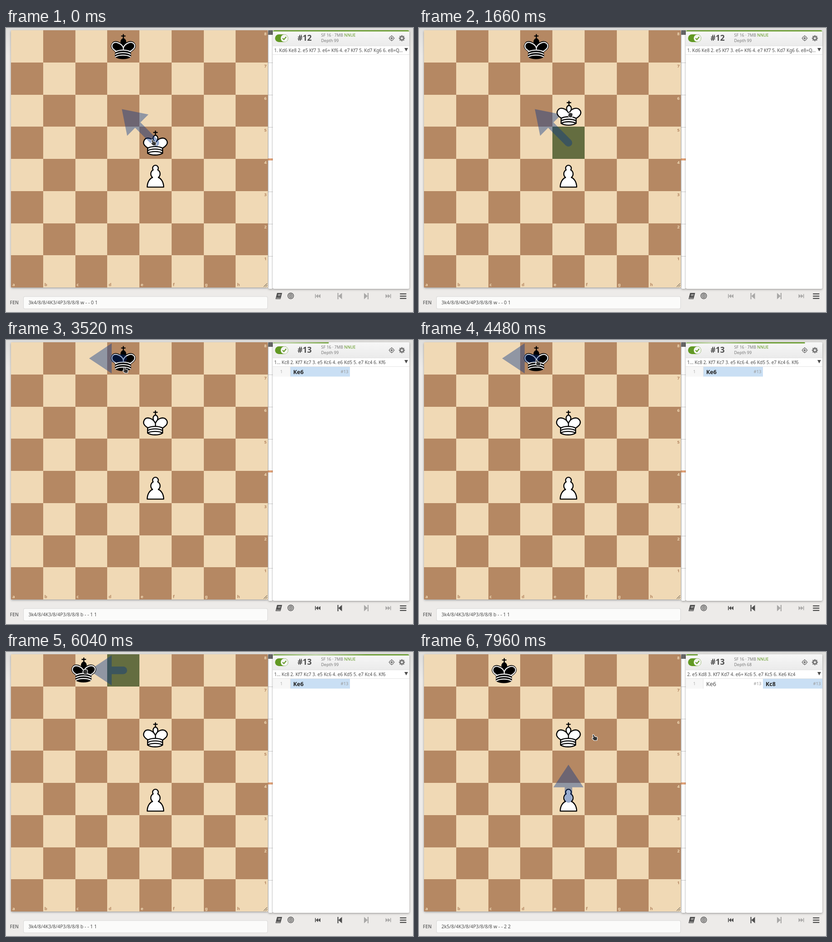
An HTML page with a canvas that plays this animation: 897x625 px, repeating every 8000 ms.

```html
<!DOCTYPE html>
<html lang="en">
<head>
<meta charset="utf-8">
<title>Chess endgame analysis</title>
<style>
html, body { margin: 0; width: 100%; height: 100%; overflow: hidden; background: #edebe9; }
canvas { display: block; }
</style>
</head>
<body>
<canvas id="stage" width="897" height="625"></canvas>
<script>
const ctx = document.getElementById('stage').getContext('2d');
const LOOP = 8000, BX = 11, BY = 5, SQ = 70.75;
const LIGHT = '#f0d9b5', DARK = '#b58863', GREEN = '#629924', INK = '#4d4d4d', DIM = '#787878', PALE = '#a9a8a7';
const FONT = '"Noto Sans", "Open Sans", sans-serif';

// piece outlines on a 45 unit square
const cross = new Path2D('M22.5 11.63V6M20 8h5');
const crown = new Path2D('M22.5 25s4.5-7.5 3-10.5c0 0-1-2.5-3-2.5s-3 2.5-3 2.5c-1.5 3 3 10.5 3 10.5');
const robe = new Path2D('M11.5 37c5.5 3.5 15.5 3.5 21 0v-7s9-4.5 6-10.5c-4-6.5-13.5-3.5-16 4V27v-3.5c-3.5-7.5-13-10.5-16-4-3 6 5 10 5 10V37');
const folds = new Path2D('M11.5 30c5.5-3 15.5-3 21 0m-21 3.5c5.5-3 15.5-3 21 0m-21 3.5c5.5-3 15.5-3 21 0');
const trim = new Path2D('M32 29.5s8.5-4 6.03-9.65C34.15 14 25 18 22.5 24.5l.01 2.1-.01-2.1C20 18 9.906 14 6.997 19.85c-2.497 5.65 4.853 9 4.853 9');
const pawnShape = new Path2D('M22.5 9c-2.21 0-4 1.79-4 4 0 .89.29 1.71.78 2.38C17.33 16.5 16 18.59 16 21c0 2.03.94 3.84 2.41 5.03-3 1.06-7.41 5.55-7.41 13.47h23c0-7.92-4.41-12.41-7.41-13.47 1.47-1.19 2.41-3 2.41-5.03 0-2.41-1.33-4.5-3.28-5.62.49-.67.78-1.49.78-2.38 0-2.21-1.79-4-4-4z');
const pointer = new Path2D('M-4-5.4q1.2-1.4 2.3.2l1.5 3.6 4.2.9q1.8.5 1.6 2.3l-.7 2.6v2h-6l-3.4-3.6q-1.2-1.8.8-1.7l1.4.5z');
const fist = new Path2D('M-3.4-3q1-1.5 2.2-.6 1-1 2.2-.1 1.3-.7 2.1.4 1.6-.2 1.7 1.5l-.4 4-.9 3.2h-5.2l-3-3.6q-1-1.7.8-1.8z');

const boardState = {
  start: {
    fen: '3k4/8/8/4K3/4P3/8/8/8 w - - 0 1', score: '#12', depth: 'Depth 99',
    pv: '1. Kd6 Ke8 2. e5 Kf7 3. e6+ Kf6 4. e7 Kf7 5. Kd7 Kg6 6. e8=Q...', arrow: 'e5d6', moves: []
  },
  shallow: {
    fen: '3k4/8/4K3/8/4P3/8/8/8 b - - 1 1', score: '+7.3', depth: 'Depth 1 · 4.9 Mn/s',
    pv: '1... Kc7', arrow: 'd8c7', moves: [['Ke6', '+7.3']]
  },
  deep: {
    fen: '3k4/8/4K3/8/4P3/8/8/8 b - - 1 1', score: '#13', depth: 'Depth 99',
    pv: '1... Kc8 2. Kf7 Kc7 3. e5 Kc6 4. e6 Kd5 5. e7 Kc4 6. Kf6', arrow: 'd8c8', moves: [['Ke6', '#13']]
  },
  reply: {
    fen: '2k5/8/4K3/8/4P3/8/8/8 w - - 2 2', score: '#13', depth: 'Depth 68',
    pv: '2. e5 Kd8 3. Kf7 Kd7 4. e6+ Kc6 5. e7 Kc5 6. Ke6 Kc4', arrow: 'e4e5', moves: [['Ke6', '#13'], ['Kc8', '#13']]
  }
};
const waiting = { ...boardState.reply, depth: 'Depth 1', pv: '2. e5', arrow: '' };

// time, x, y of the hand
const route = [
  [0, 325, 252], [540, 325, 252], [720, 331, 262], [1000, 331, 262], [1280, 333, 213], [1659, 333, 213],
  [1660, 333.5, 191], [2260, 333.5, 191], [2780, 294.5, 103], [3060, 284, 74], [3200, 284, 74], [3520, 263, 66],
  [3660, 263, 66], [4060, 246, 63], [4200, 246, 63], [4480, 262, 50], [4740, 262, 52], [5020, 262, 46],
  [5200, 260, 45], [5340, 226, 44], [5460, 182, 43], [5600, 180, 43], [6040, 174.5, 43], [6440, 174.5, 43],
  [6980, 189.5, 43], [7220, 191, 44], [7300, 210, 55], [7420, 226, 90], [7580, 275, 122], [7960, 387, 188], [8000, 390, 189]
];

function handAt(t) {
  let i = 1;
  while (i < route.length - 1 && route[i][0] <= t) i++;
  const a = route[i - 1], b = route[i], k = Math.min(1, (t - a[0]) / (b[0] - a[0]));
  return [a[1] + (b[1] - a[1]) * k, a[2] + (b[2] - a[2]) * k];
}

// cubic-bezier(.25, .1, .25, 1)
function ease(x) {
  if (x <= 0) return 0;
  if (x >= 1) return 1;
  let lo = 0, hi = 1, s = x;
  for (let i = 0; i < 20; i++) {
    s = (lo + hi) / 2;
    const r = 1 - s;
    if (.75 * r * r * s + .75 * r * s * s + s * s * s < x) lo = s; else hi = s;
  }
  const r = 1 - s;
  return .3 * r * r * s + 3 * r * s * s + s * s * s;
}

function rect(x, y, w, h, color) {
  ctx.fillStyle = color;
  ctx.fillRect(x, y, w, h);
}
function round(x, y, w, h, r, color) {
  ctx.fillStyle = color;
  ctx.beginPath();
  ctx.roundRect(x, y, w, h, r);
  ctx.fill();
}
function poly(color, ...p) {
  ctx.fillStyle = color;
  ctx.beginPath();
  for (let i = 0; i < p.length; i += 2) ctx.lineTo(p[i], p[i + 1]);
  ctx.fill();
}
function line(color, width, ...p) {
  ctx.strokeStyle = color;
  ctx.lineWidth = width;
  ctx.beginPath();
  for (let i = 0; i < p.length; i += 2) ctx.lineTo(p[i], p[i + 1]);
  ctx.stroke();
}
function disc(x, y, r, color) {
  ctx.fillStyle = color;
  ctx.beginPath();
  ctx.arc(x, y, r, 0, 7);
  ctx.fill();
}
function ring(x, y, r, width, color) {
  ctx.strokeStyle = color;
  ctx.lineWidth = width;
  ctx.beginPath();
  ctx.arc(x, y, r, 0, 7);
  ctx.stroke();
}
function text(s, x, y, size, color, weight = 400, align = 'left') {
  ctx.font = `${weight} ${size}px ${FONT}`;
  ctx.textAlign = align;
  ctx.fillStyle = color;
  ctx.fillText(s, x, y);
}
function gradient(y0, y1, top, bottom) {
  const g = ctx.createLinearGradient(0, y0, 0, y1);
  g.addColorStop(0, top);
  g.addColorStop(1, bottom);
  return g;
}
function shadowBox(x, y, w, h) {
  ctx.save();
  ctx.shadowColor = 'rgba(0,0,0,.35)';
  ctx.shadowBlur = 4;
  ctx.shadowOffsetY = 1.5;
  round(x, y, w, h, 3, '#fff');
  ctx.restore();
}

const center = s => [BX + (s.charCodeAt(0) - 96.5) * SQ, BY + (8.5 - s[1]) * SQ];

function piece(kind, [x, y]) {
  ctx.save();
  ctx.translate(x - SQ / 2, y - SQ / 2);
  ctx.scale(SQ / 45, SQ / 45);
  ctx.lineWidth = 1.5;
  ctx.lineJoin = ctx.lineCap = 'round';
  ctx.strokeStyle = '#000';
  ctx.fillStyle = kind === 'k' ? '#000' : '#fff';
  if (kind === 'P') {
    ctx.fill(pawnShape);
    ctx.stroke(pawnShape);
  } else {
    ctx.stroke(cross);
    for (const p of [crown, robe]) { ctx.fill(p); ctx.stroke(p); }
    if (kind === 'k') {
      ctx.strokeStyle = '#ececec';
      ctx.stroke(trim);
    }
    ctx.stroke(folds);
  }
  ctx.restore();
}

function arrow(move) {
  if (!move) return;
  const [x, y] = center(move.slice(0, 2)), [tx, ty] = center(move.slice(2));
  const w = SQ * 15 / 64, len = Math.hypot(tx - x, ty - y) + 4.7, base = len - 3 * w;
  ctx.save();
  ctx.translate(x, y);
  ctx.rotate(Math.atan2(ty - y, tx - x));
  ctx.fillStyle = 'rgba(0,48,136,.4)';
  ctx.beginPath();
  ctx.arc(0, 0, w / 2, Math.PI / 2, Math.PI * 1.5, false);
  if (base > 0) ctx.lineTo(base, -w / 2);
  ctx.lineTo(base, -2 * w);
  ctx.lineTo(len, 0);
  ctx.lineTo(base, 2 * w);
  ctx.lineTo(base, w / 2);
  ctx.fill();
  ctx.restore();
}

function drawSquares(lit) {
  shadowBox(BX, BY, SQ * 8, SQ * 8);
  rect(BX, BY, SQ * 8, SQ * 8, LIGHT);
  const cell = (c, r, color) => {
    const x = Math.round(BX + c * SQ), y = Math.round(BY + r * SQ);
    rect(x, y, Math.round(BX + (c + 1) * SQ) - x, Math.round(BY + (r + 1) * SQ) - y, color);
  };
  for (let i = 0; i < 64; i++) if ((i + (i >> 3)) % 2) cell(i % 8, i >> 3, DARK);
  if (lit) cell(lit.charCodeAt(0) - 97, 8 - lit[1], 'rgba(20,85,30,.5)');
  for (let i = 0; i < 8; i++) {
    text(8 - i, 574.5, BY + i * SQ + 11, 9.5, i % 2 ? DARK : LIGHT, 700, 'right');
    text('abcdefgh'[i], BX + i * SQ + 3, 568, 9.5, i % 2 ? DARK : LIGHT, 700);
  }
  line('#333', 1, 568, 569.5, 575.5, 562);
  line('#333', 1, 572, 569.5, 575.5, 566);
}

function drawGauge() {
  shadowBox(578, BY, 10, 569);
  rect(578, BY, 10, 10, '#666');
  for (let i = 1; i < 8; i++) if (i !== 4) rect(578, Math.round(BY + i * 71), 10, 1, '#ccc');
  rect(577, 287, 11, 4.5, '#e2a277');
}

function drawGear(x, y) {
  ctx.save();
  ctx.translate(x, y);
  for (let i = 0; i < 8; i++) {
    rect(-1.4, -6.6, 2.8, 3, DIM);
    ctx.rotate(Math.PI / 4);
  }
  ring(0, 0, 3.7, 2.7, DIM);
  ctx.restore();
}

function drawPanel(s, t) {
  shadowBox(588, BY, 301, 569);
  ctx.save();
  ctx.beginPath();
  ctx.roundRect(588, BY, 301, 569, 4);
  ctx.clip();
  rect(588, BY, 301, 34, gradient(BY, 39, '#f7f7f7', '#ebebeb'));
  rect(588, 39, 301, 1, '#e2e2e2');
  rect(588, 58, 301, 1, '#e4e4e4');

  let bar = 1;
  if (t >= 2260) bar = t < 7560 ? ease((t - 2795) / 2900) : ease((t - 7685) / 2900);
  rect(588, 5, 301 * bar, 2.5, GREEN);
  if (t > 2795 && t < 7560) {
    const mid = 719 - .0265 * (7420 - t), g = ctx.createLinearGradient(mid - 112, 0, mid + 112, 0);
    g.addColorStop(0, 'rgba(255,255,255,0)');
    g.addColorStop(.5, 'rgba(255,255,255,.6)');
    g.addColorStop(1, 'rgba(255,255,255,0)');
    rect(588, 5, 301 * bar, 2.5, g);
  }

  round(593, 14, 29, 17, 8.5, GREEN);
  disc(613.5, 22.5, 8, '#f5f5f5');
  line(GREEN, 2, 609.5, 22.5, 612.5, 25.5, 617.5, 19.5);
  text(s.score, 642.5, 28, 17.4, INK, 700);
  const x = s.score[0] === '+' ? 697 : 694.5;
  text('SF 16 · 7MB ', x, 19, 9, DIM);
  text('NNUE', x + ctx.measureText('SF 16 · 7MB ').width, 19, 9, GREEN);
  text(s.depth, x, 31, 9, DIM);

  ring(850, 22.5, 4.6, 1.5, DIM);
  disc(850, 22.5, 2.3, DIM);
  for (const d of [-1, 1]) {
    line(DIM, 1.5, 850 + d * 4, 22.5, 850 + d * 6.6, 22.5);
    line(DIM, 1.5, 850, 22.5 + d * 4, 850, 22.5 + d * 6.6);
  }
  drawGear(872.5, 22.5);
  text(s.pv, 591, 52.5, 10.06, INK);
  poly(INK, 878, 44, 886, 44, 882, 51.5);

  if (s.moves.length) {
    rect(588, 59, 39, 21.5, '#f7f7f7');
    rect(626, 59, 1, 21.5, '#e6e6e6');
    text('1', 607, 73, 9.3, '#aaa', 400, 'center');
  }
  s.moves.forEach(([san, score], i) => {
    const mx = 627 + i * 131, active = i === s.moves.length - 1;
    if (active) rect(mx, 59, 131, 21.5, '#c9dff4');
    text(san, mx + 6, 74.5, 12.5, active ? '#222' : INK, active ? 700 : 400);
    text(score, mx + 127.5, 73, 9.5, '#999', 400, 'right');
  });
  ctx.restore();
}

function skip(x, dir, color, double) {
  ctx.save();
  ctx.translate(x, 590);
  ctx.scale(dir, 1);
  if (double) {
    rect(-6, -4.5, 1.7, 9, color);
    poly(color, -4.3, 0, 1, -4.5, 1, 4.5);
    poly(color, .8, 0, 6, -4.5, 6, 4.5);
  } else {
    rect(-5, -7, 2.2, 14, color);
    poly(color, -3, 0, 5, -7, 5, 7);
  }
  ctx.restore();
}

function drawFooter(s) {
  text('FEN', 8.5, 608, 10.2, DIM, 700);
  round(38, 590.5, 539, 28, 4, '#d9d8d7');
  round(39, 591.5, 537, 26, 3, '#fbfbfa');
  text(s.fen, 49.5, 608, 10.5, INK);

  poly(INK, 597.5, 583, 608.5, 583, 605, 596.5, 594, 596.5);
  line('#edebe9', 1, 599.5, 586.5, 605.5, 586.5);
  line('#edebe9', 1, 599, 589, 605, 589);
  line('#edebe9', 1, 595.5, 594.3, 604.5, 594.3);
  ring(627.5, 589.5, 6.3, 1.4, INK);
  ring(627.5, 589.5, 3.5, 1.4, INK);
  disc(627.5, 589.5, 1.4, INK);

  const back = s.moves.length ? INK : PALE;
  skip(687, 1, back, true);
  skip(735.5, 1, back, false);
  skip(794, -1, PALE, false);
  skip(842.5, -1, PALE, true);
  for (let i = 0; i < 3; i++) round(868, 584 + i * 5, 14.5, 2.2, 1, INK);
}

function drawHand([x, y], held) {
  ctx.save();
  ctx.translate(x, y);
  const shape = held ? fist : pointer;
  ctx.lineJoin = 'round';
  ctx.lineWidth = 2.2;
  ctx.strokeStyle = '#fff';
  ctx.stroke(shape);
  ctx.fillStyle = '#333';
  ctx.fill(shape);
  ctx.restore();
}

function stateAt(t) {
  if (t < 2260) return boardState.start;
  if (t < 2820) return boardState.shallow;
  if (t < 7560) return boardState.deep;
  return t < 7720 ? waiting : boardState.reply;
}

function draw(t) {
  const s = stateAt(t), hand = handAt(t), grip = [hand[0] - 3, hand[1] - 4];
  const whiteHeld = t >= 1000 && t < 2260, blackHeld = t >= 5180 && t < 7220;
  rect(0, 0, 897, 625, '#edebe9');
  rect(0, 0, 897, 60, gradient(0, 60, '#dfdedc', '#edebe9'));
  drawGauge();
  drawSquares(whiteHeld ? 'e5' : blackHeld ? 'd8' : '');
  drawPanel(s, t);
  drawFooter(s);

  piece('P', center('e4'));
  if (!whiteHeld) piece('K', center(t < 1000 ? 'e5' : 'e6'));
  if (!blackHeld) piece('k', center(t < 5180 ? 'd8' : 'c8'));
  arrow(s.arrow);
  if (whiteHeld) piece('K', grip);
  if (blackHeld) piece('k', grip);
  drawHand(hand, whiteHeld || blackHeld);
}

const begin = performance.now();
function tick() {
  draw((performance.now() - begin) % LOOP);
  requestAnimationFrame(tick);
}
tick();
</script>
</body>
</html>
```
